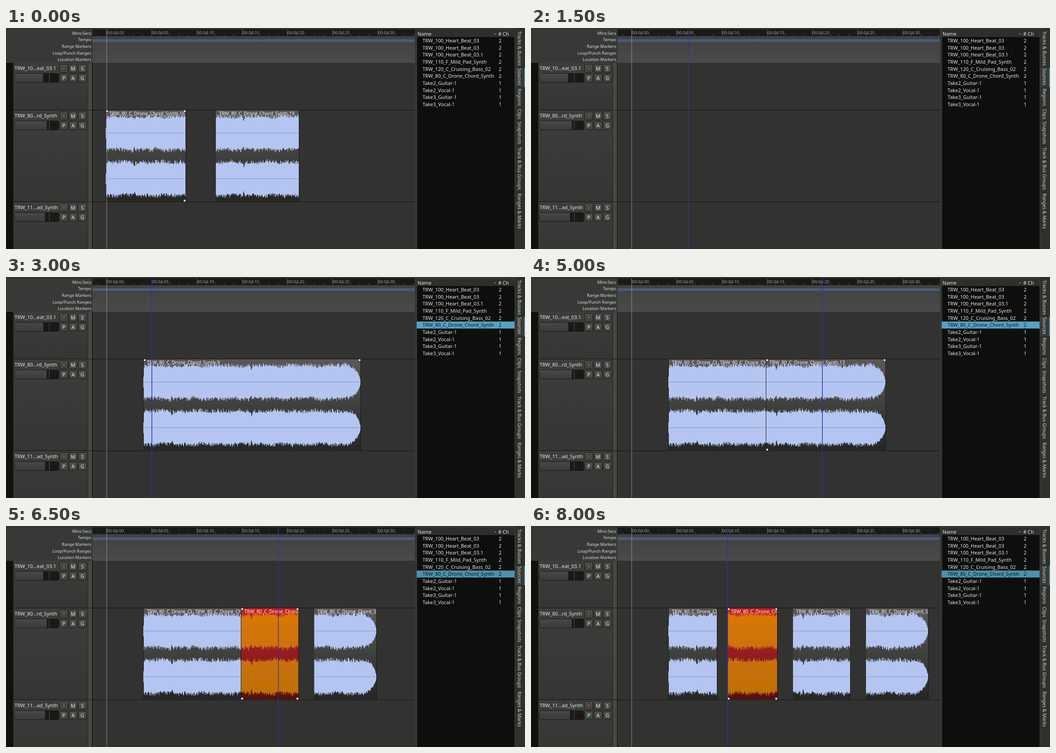
Write an HTML page with a canvas that moves like this. It is 1145 px wide and 489 px high and loops after 8500 ms.

```html
<!DOCTYPE html>
<html lang="en">
<head>
<meta charset="utf-8">
<title>Ripple editing</title>
<style>
  html, body { margin: 0; width: 100%; height: 100%; overflow: hidden; background: #2f312f; }
  canvas { display: block; }
</style>
</head>
<body>
<canvas id="stage" width="1145" height="489"></canvas>
<script>
const ctx = document.getElementById('stage').getContext('2d');
const STEP = 500, SOURCE_LENGTH = 478, SYNTH = 'TRW_80_C_Drone_Chord_Synth';
const TOP = 182, BOTTOM = 384;

function rect(x, y, w, h, fill) {
  ctx.fillStyle = fill;
  ctx.fillRect(x, y, w, h);
}

function text(str, x, y, size = 10.85, fill = '#e8e8e6', align = 'left') {
  ctx.font = `${size}px "Noto Sans", "Open Sans", sans-serif`;
  ctx.textAlign = align;
  ctx.fillStyle = fill;
  ctx.fillText(str, x, y);
}

function fade(y0, y1, ...colors) {
  const g = ctx.createLinearGradient(0, y0, 0, y1);
  colors.forEach((c, i) => g.addColorStop(i / (colors.length - 1), c));
  return g;
}

function box(x, y, w, h, fill) {
  ctx.beginPath();
  ctx.roundRect(x + .5, y + .5, w - 1, h - 1, 3);
  ctx.fillStyle = fill;
  ctx.fill();
  ctx.strokeStyle = '#161715';
  ctx.lineWidth = 1;
  ctx.stroke();
}

// --- Waveform ---------------------------------------------------------
const hash = n => { const v = Math.sin(n * 12.9898) * 43758.5453; return v - Math.floor(v); };
const dip = (o, at, width) => Math.exp(-(((o - at) / width) ** 2));

function amplitude(o, edge) {
  const noise = 8 * hash(o + edge * 531) ** 1.6 + 3 * hash(Math.floor(o / 3) + edge * 77);
  const swell = 2 * Math.sin(o * .11 + edge * 2) * Math.sin(o * .037);
  const tail = Math.sqrt(Math.max(.03, 1 - (Math.max(0, o - 445) / 32) ** 2));
  return (32 + noise + swell - 8 * dip(o, 237, 2) - 6 * dip(o, 62, 1.6)) * tail;
}

function drawWave({ x, w, offset }, mid, channel, fill) {
  ctx.fillStyle = fill;
  if (offset === 0) ctx.fillRect(x - 1, mid - 12, 1, 24);
  for (let i = 0; i < w; i++) {
    const up = amplitude(offset + i, channel * 2);
    const down = amplitude(offset + i, channel * 2 + 1);
    ctx.fillRect(x + i, mid - up, 1, up + down);
  }
}

// --- Regions ----------------------------------------------------------
function drawHandles({ x, w, offset }) {
  const right = x + w - 4, low = BOTTOM - 4;
  const spots = [[x, TOP], [right, TOP]];
  if (offset > 0) spots.push([x, low]);
  if (offset + w < SOURCE_LENGTH) spots.push([right, low]);
  for (const [hx, hy] of spots) {
    rect(hx - 1, hy, 6, 5, '#222');
    rect(hx, hy, 4, 4, '#e4e4e4');
  }
}

function drawRegion(r) {
  const { x, w, offset, red, hot } = r;
  ctx.save();
  ctx.beginPath();
  ctx.rect(x - 1, TOP, w + 2, BOTTOM - TOP);
  ctx.clip();
  if (hot || offset === 0) rect(x - 1, TOP, 1, 202, '#1c1d1c');
  rect(x + w, TOP, 1, 202, '#171817');
  rect(x, TOP, w, 201, red
    ? fade(TOP, BOTTOM, '#c52127', '#951c21', '#521010')
    : fade(TOP, BOTTOM, '#5e5858', '#3f413d', '#242624'));
  rect(x, TOP, w, 12, red ? '#c42127' : '#5b5656');
  const fill = red ? fade(TOP, BOTTOM, '#dc7800', '#cc7010', '#be7000') : '#b4c5f2';
  [232, 333].forEach((mid, channel) => {
    drawWave(r, mid + .5, channel, fill);
    rect(x, mid, w, 1, red ? '#a8793a' : '#8e97af');
  });
  ctx.beginPath();
  ctx.rect(x, TOP, w, 20);
  ctx.clip();
  text(`${SYNTH}.${r.take}`, x + 7, 192.5, 10.45, '#f4f4f4');
  ctx.restore();
  if (hot) drawHandles(r);
}

const pair = (hot, reds = []) => [
  { x: 221, offset: 0, w: 175, take: 18 },
  { x: 463, offset: 176, w: 183, take: 19 }
].map((r, i) => ({ ...r, hot: i === hot, red: reds.includes(i) }));

function split(cuts, hot, red, shifts = []) {
  const ends = [...cuts, SOURCE_LENGTH];
  return ends.map((end, i) => {
    const offset = i ? ends[i - 1] : 0;
    return {
      x: 304 + offset + (shifts[i] || 0), offset, w: end - offset,
      take: 9 + 2 * i, hot: i === hot, red: i === red
    };
  });
}

const CUTS = [106, 215, 341];
const scenes = [
  { regions: pair(0) },
  { regions: pair(1, [1]), line: 560 },
  { regions: pair(0, [0, 1]), line: 357 },
  { line: 346 },
  { drag: [986, 114] },
  { drag: [337, 275] },
  { regions: split([], 0), line: 321 },
  { regions: split([], 0), line: 409 },
  { regions: split(CUTS.slice(0, 1)), line: 409 },
  { regions: split(CUTS.slice(0, 2)), line: 518 },
  { regions: split(CUTS.slice(0, 2), 2), line: 642 },
  { regions: split(CUTS, 3, 3), line: 715 },
  { regions: split(CUTS, 3, 3, [0, 0, 0, 35]), line: 680 },
  { regions: split(CUTS, 2, 2, [0, 0, 0, 35]), line: 600 },
  { regions: split(CUTS, 2, 2, [0, 0, 35, 70]), line: 553 },
  { regions: split(CUTS, 1, 1, [0, 0, 35, 70]), line: 460 },
  { regions: split(CUTS, 1, 1, [0, 24, 59, 94]), line: 433 }
];

// --- Window parts -----------------------------------------------------
function drawRulers() {
  rect(0, 0, 191, 77, '#373937');
  rect(191, 3, 711, 15, '#191b19');
  rect(191, 18, 711, 59, fade(18, 77, '#414141', '#4a4a4a'));
  rect(191, 25, 711, 6, '#4a5b78');
  ['Mins:Secs', 'Tempo', 'Range Markers', 'Loop/Punch Ranges', 'Location Markers']
    .forEach((name, i) => text(name, 188, 14.5 + i * 14.7, 9.1, '#dededc', 'right'));
  for (let i = -1; i < 35; i++) {
    const x = Math.round(222 + i * 19.93 - .4), major = i % 5 === 0;
    if (x < 901) rect(x, major ? 4 : 14, 1, major ? 13 : 3, '#666864');
    if (major) text(`00:04:${String(i).padStart(2, '0')}`, x + 1, 14, 9.4, '#a0a19e');
  }
}

function drawTrack(y, h, name, level) {
  rect(191, y, 711, h, '#323231');
  rect(16, y, 175, h, fade(y, y + h, '#3c3e3b', '#343633'));
  rect(181, y, 10, h, '#1a1b19');
  rect(182, y, 3, h, '#555753');
  rect(186, y, 3, h, '#555753');
  rect(16, y + h - 1, 886, 1, '#111210');
  text(name, 19, y + 16, 10.9);
  box(18, y + 23, 99, 21, '#191a18');
  rect(19, y + 24, level - 19, 19, fade(y + 24, y + 43, '#474946', '#393b38'));
  rect(95, y + 24, 1, 19, '#555753');
  ['', 'M', 'S', 'P', 'A', 'G'].forEach((label, i) => {
    const bx = 118 + (i % 3) * 20.5, by = y + (i < 3 ? 3 : 24.5);
    box(bx, by, 19, 19, fade(by, by + 19, '#50524f', '#41433f'));
    text(label, bx + 9.5, by + 13.5, 10.8, '#eee', 'center');
  });
  ctx.beginPath();
  ctx.arc(127.5, y + 12.5, 4.3, 0, 7);
  ctx.fillStyle = '#704a4a';
  ctx.fill();
  ctx.strokeStyle = '#2c2424';
  ctx.stroke();
}

const sources = [
  'TRW_100_Heart_Beat_03', 'TRW_100_Heart_Beat_03', 'TRW_100_Heart_Beat_03.1',
  'TRW_110_F_Mild_Pad_Synth', 'TRW_120_C_Cruising_Bass_02', SYNTH,
  'Take2_Guitar-1', 'Take2_Vocal-1', 'Take3_Guitar-1', 'Take3_Vocal-1'
];

function drawSources(index) {
  rect(902, 0, 243, 489, '#353735');
  rect(907, 4, 215, 485, '#0d0f0c');
  rect(907, 4, 215, 16, '#2d2f2d');
  text('Name', 908, 16.5);
  text('# Ch', 1086, 16.5);
  rect(1077, 12, 4, 1, '#888');
  rect(1078, 13, 2, 1, '#888');
  sources.forEach((name, i) => {
    const y = 32 + i * 15.67, selected = i === 5 && index >= 4;
    if (selected) rect(906, 98.5, 216, 15.5, index < 11 ? '#53a2c6' : '#4a92ad');
    const fill = selected ? '#0c1317' : '#e8e8e6';
    text(name, 919, y, 10.85, fill);
    text(i < 6 ? '2' : '1', 1087, y, 10.85, fill);
  });
}

function drawTabs() {
  rect(1122, 0, 23, 489, '#2e302e');
  rect(1122, 0, 1, 489, '#3d3f3d');
  rect(1123, 88, 20, 43, '#383a38');
  rect(1143.5, 88, 1.5, 43, '#57a5c6');
  const tabs = { 'Tracks & Busses': 7, Sources: 89, Regions: 134, Clips: 179, Snapshots: 207,
    'Track & Bus Groups': 264, 'Ranges & Marks': 366 };
  for (const [name, y] of Object.entries(tabs)) {
    ctx.save();
    ctx.translate(1128.5, y);
    ctx.rotate(Math.PI / 2);
    text(name, 0, 0, 10.3, '#d6d6d4');
    ctx.restore();
  }
}

function draw(index) {
  const { regions = [], line, drag } = scenes[index];
  rect(0, 0, 1145, 489, '#0f110e');
  drawRulers();
  drawTrack(77, 105, 'TRW_10...eat_03.1', 82);
  drawTrack(182, 203, 'TRW_80...rd_Synth', 90);
  drawTrack(385, 105, 'TRW_11...ad_Synth', 86);
  rect(0, 0, 1145, 3, '#323432');
  regions.forEach(drawRegion);
  rect(221.5, 3, 1.3, 486, 'rgba(170,170,170,.6)');
  if (line) rect(line, 3, 1.5, 486, '#2b369f');
  drawSources(index);
  drawTabs();
  if (drag) {
    const [x, y] = drag;
    rect(x - 1, y, 160, 14, '#3b3d3b');
    text(SYNTH, x, y + 10.7);
  }
}

let shown = -1;
function tick(now) {
  const index = Math.floor(now / STEP) % scenes.length;
  if (index !== shown) draw(shown = index);
  requestAnimationFrame(tick);
}
tick(performance.now());
</script>
</body>
</html>
```
